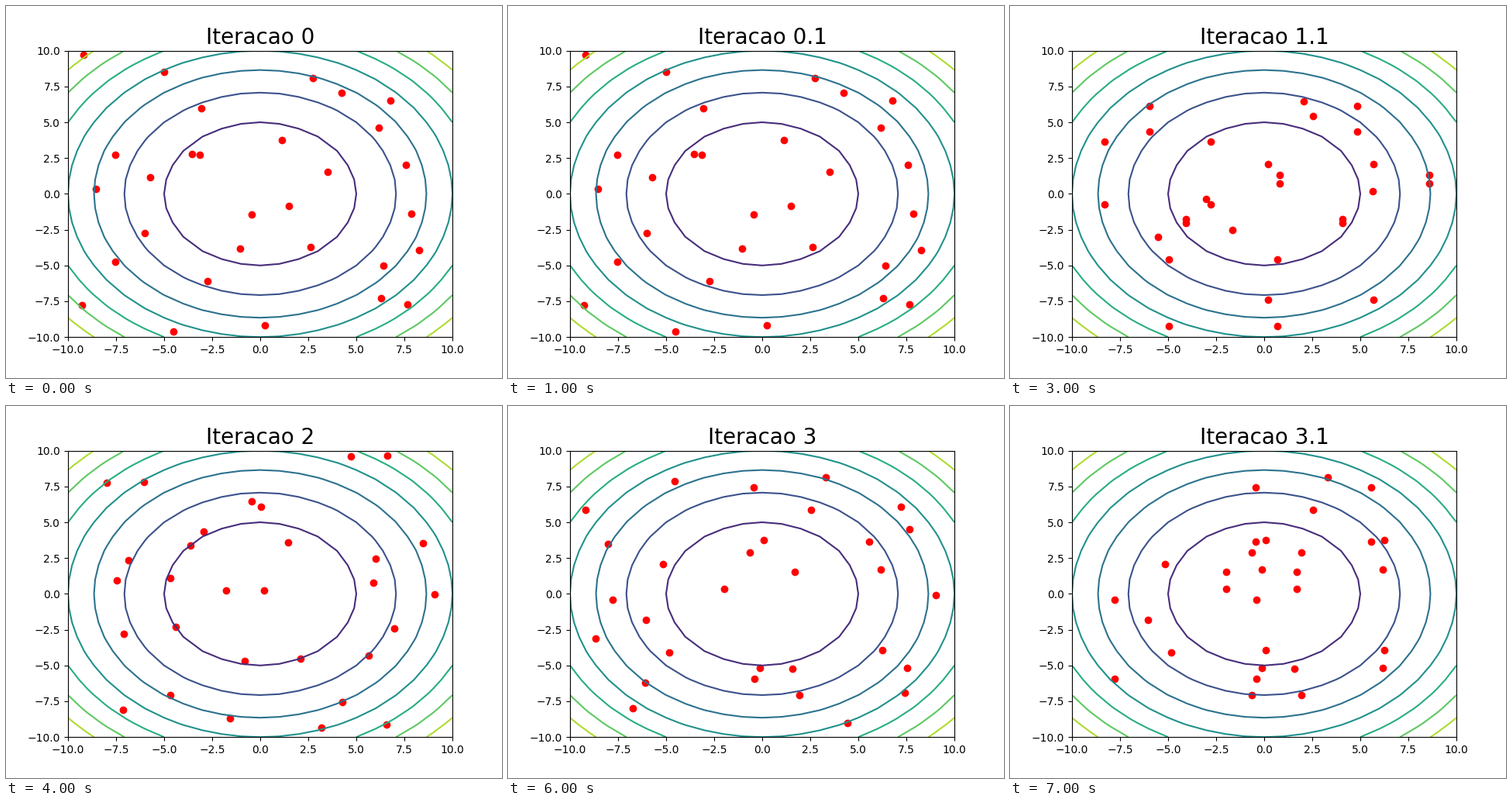
Write a matplotlib script that moves like this. It is 640x480 px and loops after 8 s.

```python
import numpy as np
import matplotlib.pyplot as plt
from matplotlib.animation import FuncAnimation

W, H, DPI = 640, 480, 100
LIMIT = 10
ITERATIONS = 4
COLS, ROWS = 6, 5
SURVIVORS, PAIRS = 18, 6

rng = np.random.default_rng(11)


def scatter_population():
    """One random point in each cell of a grid, for even coverage."""
    col, row = np.meshgrid(np.arange(COLS), np.arange(ROWS))
    cells = np.column_stack([col.ravel(), row.ravel()])
    unit = (cells + rng.random(cells.shape)) / (COLS, ROWS)
    return LIMIT * (1.94 * unit - 0.97)


def breed(pop):
    """Keep mostly the points near the centre; pairs of them swap x and y."""
    score = (pop**2).sum(axis=1) * rng.uniform(0.6, 1.4, len(pop))
    kept = pop[np.argsort(score)[:SURVIVORS]]
    a, b = rng.permutation(kept)[:2 * PAIRS].reshape(2, PAIRS, 2)
    cross = np.column_stack([a[:, 0], b[:, 1]])
    mirror = np.column_stack([b[:, 0], a[:, 1]])
    return np.concatenate([kept, cross, mirror])


def evolve():
    steps = []
    for n in range(ITERATIONS):
        pop = scatter_population()
        # The first population is shown twice, before any selection.
        steps += [(f"{n}", pop), (f"{n}.1", breed(pop) if n else pop)]
    return steps


steps = evolve()

plt.rcParams["font.family"] = "DejaVu Sans"
fig, ax = plt.subplots(figsize=(W / DPI, H / DPI), dpi=DPI)

axis = np.arange(-LIMIT, LIMIT + 1)
X, Y = np.meshgrid(axis, axis)
ax.contour(X, Y, X**2 + Y**2, levels=np.arange(0, 201, 25))
ax.set_xlim(-LIMIT, LIMIT)
ax.set_ylim(-LIMIT, LIMIT)

dots = ax.scatter([], [], color="red")
title = ax.set_title("", fontsize=20)


def draw(i):
    label, pop = steps[i]
    title.set_text(f"Iteracao {label}")
    dots.set_offsets(pop)
    return dots, title


anim = FuncAnimation(fig, draw, frames=len(steps), interval=1000,
                     repeat=True, repeat_delay=0)
plt.show()
```
